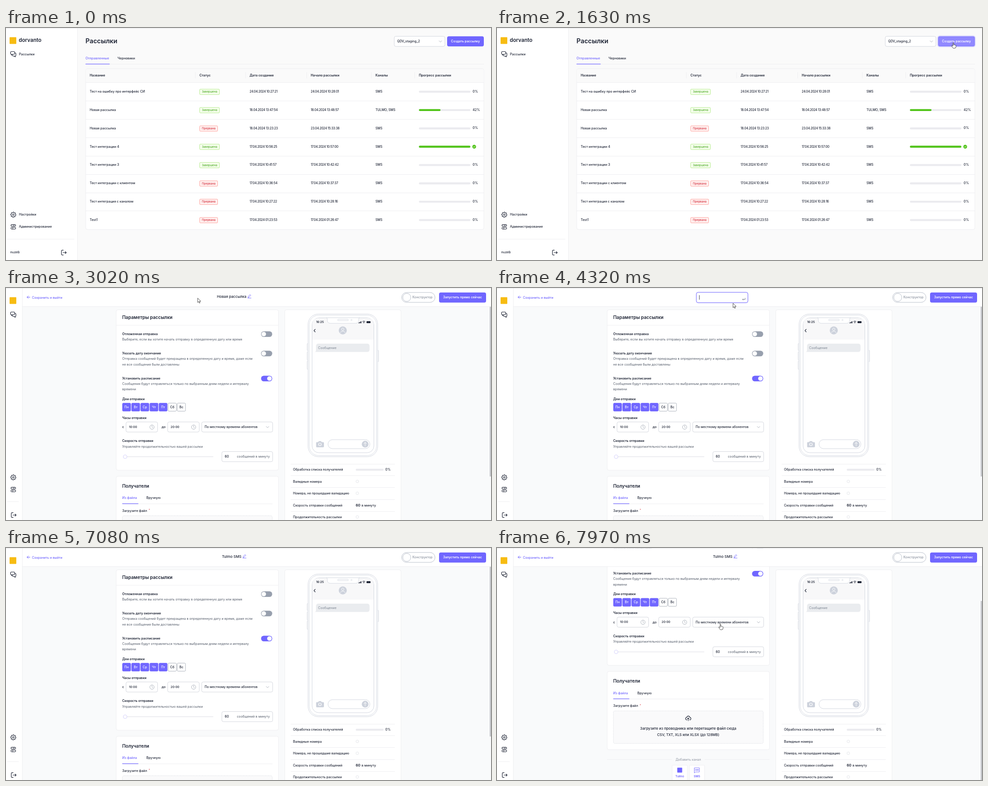
Animation, 1083 px wide and 517 px high, one loop 8000 ms. Source, as an HTML page:

```html
<!DOCTYPE html>
<html lang="ru">
<head>
<meta charset="utf-8">
<title>Рассылки</title>
<style>
  html, body { margin: 0; width: 100%; height: 100%; overflow: hidden; background: #fafafa; }
  svg { display: block; width: 1083px; height: 517px; }
  text { font-family: Inter, "Open Sans", "Noto Sans", sans-serif; white-space: pre; }
  .date { letter-spacing: -.25px; }
</style>
</head>
<body>
<svg id="stage" viewBox="0 0 1083 517" xmlns="http://www.w3.org/2000/svg"></svg>
<script>
const LOOP = 8000;
const INK = '#1c2233', GREY = '#525a68', PALE = '#cdd2dc', EDGE = '#eeeef1', BORDER = '#d4d7de';
const VIOLET = '#7066ff', GREEN = '#52c41a';
const stage = document.getElementById('stage');

// y is the vertical centre of the capitals
const text = (x, y, s, { size = 7.2, weight = 500, fill = INK, anchor = 'start', cls = '', id = '' } = {}) =>
  `<text ${id && `id="${id}"`} class="${cls}" x="${x}" y="${y + size * .36}" font-size="${size}" font-weight="${weight}" fill="${fill}" text-anchor="${anchor}">${s}</text>`;
const bold = (x, y, s, size = 7.15) => text(x, y, s, { size, weight: 600 });
const note = (x, y, s) => text(x, y, s, { size: 7.15, weight: 400, fill: GREY });
const rect = (x, y, w, h, fill, r = 0, stroke = 'none', extra = '') =>
  `<rect x="${x}" y="${y}" width="${w}" height="${h}" rx="${r}" fill="${fill}" stroke="${stroke}" ${extra}/>`;
const circle = (x, y, r, fill, stroke = 'none', width = 1) =>
  `<circle cx="${x}" cy="${y}" r="${r}" fill="${fill}" stroke="${stroke}" stroke-width="${width}"/>`;
const path = (d, stroke = INK, width = 1, extra = '') =>
  `<path d="${d}" fill="none" stroke="${stroke}" stroke-width="${width}" stroke-linecap="round" stroke-linejoin="round" ${extra}/>`;
const hline = (x1, x2, y, color = EDGE, width = 1) => path(`M${x1} ${y}H${x2}`, color, width);
const group = (id, body, extra = '') => `<g id="${id}" ${extra}>${body}</g>`;
const box = (x, y, w, h) => rect(x, y, w, h, '#fff', 3.5, BORDER);
const card = (x, y, w, h) => rect(x, y, w, h, '#fff', 4, EDGE);
const chevron = (x, y) => path(`M${x - 3} ${y - 1.5}l3 3l3 -3`, '#a5abb6', .9);
const clock = (x, y) => circle(x, y, 4.8, 'none', '#9aa1ad', .8) + path(`M${x} ${y - 3}v3l2 1.2`, '#9aa1ad', .8);
const bar = (x, y, w, part) => rect(x, y - 2.2, w, 4.4, '#ebebef', 2.2) +
  (part ? rect(x, y - 2.2, w * part, 4.4, GREEN, 2.2) : '');

// Icons, each drawn around its own origin
const chatIcon = path('M-4.5 -5.5h6q1.5 0 1.5 1.5v3q0 1.5 -1.5 1.5h-3.5l-2 2v-2h-.5q-1.5 0 -1.5 -1.5v-3q0 -1.5 1.5 -1.5M3 -2.5h1q1.8 0 1.8 1.5v4q0 1.5 -1.5 1.5v2l-2 -2h-2.5q-1.5 0 -1.5 -1.5v-1', INK, 1.2);
const gearIcon = (() => {
  const points = Array.from({ length: 32 }, (_, i) => {
    const a = i * Math.PI / 16, r = i % 4 < 2 ? 5.9 : 4.6;
    return `${(r * Math.cos(a)).toFixed(2)} ${(r * Math.sin(a)).toFixed(2)}`;
  });
  return path('M' + points.join('L') + 'Z', INK, 1.1) + circle(0, 0, 1.8, 'none', INK, 1.1);
})();
const slidersIcon = rect(-5.3, -4.9, 10.6, 3.9, 'none', 1.9, INK, 'stroke-width="1.1"') + path('M1.3 -4.5v3', INK) +
  rect(-5.3, 1.3, 10.6, 3.9, 'none', 1.9, INK, 'stroke-width="1.1"') + path('M-1.3 1.8v3', INK);
const exitIcon = path('M-1 -5.3h-2.5q-1.7 0 -1.7 1.7v7.2q0 1.7 1.7 1.7h2.5M-1.5 0h7M3.2 -2.4l2.4 2.4l-2.4 2.4', INK, 1.2);
const pencilIcon = path('M.5 6.2l.5 -2.3l4 -4l1.7 1.7l-4 4zM0 7.6h7.4', VIOLET, .9);

function listPage() {
  const rows = [
    ['Тест на ошибку про интерфейс СИ', 1, '24.04.2024 10:27:21', '24.04.2024 10:28:01', 0],
    ['Новая рассылка', 1, '18.04.2024 13:47:54', '18.04.2024 13:48:57', .42],
    ['Новая рассылка', 0, '18.04.2024 13:23:23', '23.04.2024 15:33:38', 0],
    ['Тест интеграции 4', 1, '17.04.2024 10:56:25', '17.04.2024 10:57:00', 1],
    ['Тест интеграции 3', 1, '17.04.2024 10:41:57', '17.04.2024 10:42:42', 0],
    ['Тест интеграции с клиентом', 0, '17.04.2024 10:36:54', '17.04.2024 10:37:37', 0],
    ['Тест интеграция с каналом', 0, '17.04.2024 10:27:22', '17.04.2024 10:28:16', 0],
    ['Test1', 0, '17.04.2024 01:23:53', '17.04.2024 01:26:47', 0],
  ];
  const date = { size: 6.9, cls: 'date' };
  const tag = (y, done) => done
    ? rect(432.5, y - 6, 44, 12, '#f6ffed', 1.5, '#b7eb8f') + text(454.5, y - .3, 'Завершена', { size: 6.3, weight: 400, fill: '#389e0d', anchor: 'middle' })
    : rect(432.5, y - 6, 40, 12, '#fff1f0', 1.5, '#ffa39e') + text(452.5, y - .3, 'Прервана', { size: 6.3, weight: 400, fill: '#cf1322', anchor: 'middle' });
  const row = ([name, done, created, started, part], i) => {
    const y = 142 + i * 40.85;
    return (i ? hline(178, 1067, Math.round(y - 20.5) + .5) : '') +
      text(187, y - .5, name) + tag(y + .3, done) +
      text(544, y - .5, created, date) + text(680.5, y - .5, started, date) +
      text(825, y - .5, part === .42 ? 'TULMO, SMS' : 'SMS', { size: 7 }) + bar(922, y, 115, part) +
      (part === 1
        ? circle(1045.5, y, 4.2, GREEN) + path(`M1043.6 ${y}l1.4 1.5l2.4 -2.8`, '#fff', .9)
        : text(1042, y - .8, Math.round(part * 100) + '%'));
  };
  const heads = [[187, 'Название'], [432, 'Статус'], [544, 'Дата создания'], [680.5, 'Начало рассылки'], [825, 'Каналы'], [922, 'Прогресс рассылки']];
  return bold(177.5, 29, 'Рассылки', 14.4) +
    box(867, 18.5, 113, 22.5) + text(873.5, 29.5, 'QDV_staging_2', { size: 7.1 }) + chevron(970, 30) +
    rect(985, 18.5, 82, 22.5, VIOLET, 4, 'none', 'id="create"') +
    text(1026, 29.5, 'Создать рассылку', { size: 6.9, weight: 600, fill: '#fff', anchor: 'middle' }) +
    text(177.5, 67.5, 'Отправленные', { fill: VIOLET }) + text(249, 67.5, 'Черновики') +
    hline(178, 1067, 80.5) + hline(178, 231, 80.3, VIOLET, 1.3) +
    card(178, 90.5, 889, 358.5) + rect(178.5, 91, 888, 30.5, '#fafafa', 3) + hline(178, 1067, 121.5) +
    heads.map(([x, s]) => bold(x, 105.3, s, 7.2)).join('') +
    [423, 535, 671.5, 816, 912.5].map(x => path(`M${x} 99v13`, EDGE)).join('') +
    rows.map(row).join('');
}

function settings() {
  const toggle = (y, on) => rect(569.5, y - 6.3, 25, 12.6, on ? VIOLET : '#98a0ae', 6.3) + circle(on ? 588.2 : 575.6, y, 5, '#fff');
  const day = (s, i) => {
    const x = 260 + i * 20.4, on = i < 5;
    return rect(x, 256.5, 18.4, 18, on ? VIOLET : '#fff', 2, on ? VIOLET : '#9aa1ad', 'stroke-width=".8"') +
      text(x + 9.2, 265.3, s, { fill: on ? '#fff' : INK, anchor: 'middle' });
  };
  const channel = (x, name, icon) => rect(x, 629.5, 34, 40, '#000', 1, 'none', 'opacity=".08"') + rect(x, 628.5, 34, 40, '#fff', 1, EDGE) +
    icon + text(x + 17, 653.3, name, { size: 6.5, weight: 600, fill: VIOLET, anchor: 'middle' });
  return card(246, 48.5, 362.5, 357.5) + bold(259.5, 65.3, 'Параметры рассылки', 10.2) + hline(246, 608, 83) +
    bold(259.5, 102, 'Отложенная отправка') + toggle(102.8, false) +
    note(259.5, 114.5, 'Выберите, если вы хотите начать отправку в определенную дату или время') +
    bold(259.5, 145, 'Указать дату окончания') + toggle(146, false) +
    note(259.5, 157.5, 'Отправка сообщений будет прекращена в определенную дату и время, даже если') +
    note(259.5, 170, 'не все сообщения были доставлены') +
    bold(259.5, 201, 'Установить расписание') + toggle(201.8, true) +
    note(259.5, 213.3, 'Сообщения будут отправляться только по выбранным дням недели и интервалу') +
    note(259.5, 225.8, 'времени') +
    bold(259.5, 247.3, 'Дни отправки') + ['Пн', 'Вт', 'Ср', 'Чт', 'Пт', 'Сб', 'Вс'].map(day).join('') +
    bold(259.5, 289.3, 'Часы отправки') +
    text(259.5, 309.5, 'с') + box(268, 298.5, 70.5, 22.5) + text(274.5, 309.5, '10:00', { size: 6.8 }) + clock(326, 310) +
    text(347.5, 309.5, 'до') + box(361, 298.5, 70.5, 22.5) + text(367.5, 309.5, '20:00', { size: 6.8 }) + clock(419, 310) +
    box(437, 298.5, 158.5, 22.5) + text(443.5, 309.5, 'По местному времени абонентов', { size: 7.1 }) + chevron(584, 310) +
    bold(259.5, 340.5, 'Скорость отправки') + note(259.5, 353, 'Управляйте продолжительностью вашей рассылки') +
    hline(266, 462, 376, '#ededf1', 2) + circle(266, 376, 4, '#fff', '#d5d2fb', 1.1) +
    box(482, 364.5, 113.5, 22.5) + text(488.5, 375.5, '60') + text(589, 375.5, 'сообщений в минуту', { weight: 400, fill: GREY, anchor: 'end' }) +

    card(246, 419.5, 362.5, 174.5) + bold(259.5, 441, 'Получатели', 10.1) +
    text(259.5, 467.5, 'Из файла', { fill: VIOLET }) + text(313.5, 467.5, 'Вручную') +
    hline(260, 595, 481) + hline(260, 295, 480.6, VIOLET, 1.3) +
    text(259.5, 496, 'Загрузите файл') + text(318.5, 495, '*', { size: 6, fill: '#e0454a' }) +
    rect(260, 507.5, 334.5, 72.5, '#fafafb', 3, '#d9dbe0', 'stroke-dasharray="2 1.5" stroke-width=".9"') +
    path('M424 527.6h-.5q-2.5 -.4 -2.5 -2.8t2.6 -2.7q.8 -3.2 3.6 -3.2t3.6 3.2q2.3 .3 2.3 2.7t-2.3 2.8h-.5M427 529.5v-6M424.8 525.3l2.2 -2.2l2.2 2.2', INK, 1.1) +
    text(427, 546.3, 'Загрузите из проводника или перетащите файл сюда', { size: 8.15, anchor: 'middle' }) +
    text(427, 560.3, 'CSV, TXT, XLS или XLSX (до 128MB)', { size: 7.9, anchor: 'middle' }) +
    hline(246, 390, 616) + hline(464, 608, 616) +
    text(427, 615.5, 'Добавить канал', { weight: 400, fill: '#8a919e', anchor: 'middle' }) +
    channel(391, 'Tulmo', rect(402.5, 634, 11, 11, VIOLET, 1)) +
    channel(429.5, 'SMS', path('M441 634.5h11v9h-8.5l-2.5 2z', VIOLET, .9) + text(446.5, 639, 'SMS', { size: 4, weight: 700, fill: VIOLET, anchor: 'middle' }));
}

function preview() {
  const dim = { fill: '#7c8592', weight: 400 };
  const labels = ['Обработка списка получателей', 'Валидные номера', 'Номера, не прошедшие валидацию', 'Скорость отправки сообщений', 'Продолжительность рассылки'];
  const statY = i => 404.8 + i * 26.4;
  return card(622.5, 48.5, 259.5, 480) +
    [[124, 15], [142.5, 18], [163, 18]].map(([y, h]) => rect(672.3, y, 2.5, h, '#fff', 1, PALE, 'stroke-width=".8"')).join('') +
    rect(829.5, 139, 2.5, 25, '#fff', 1, PALE, 'stroke-width=".8"') +
    rect(674.5, 58, 155.5, 318, '#fff', 23, PALE, 'stroke-width=".9"') + rect(677.2, 60.5, 150.2, 313, '#fff', 21, PALE, 'stroke-width=".8"') +
    rect(683.5, 66.5, 138, 300.5, '#fff', 15, PALE, 'stroke-width=".9"') +
    `<path d="M684 115V82q0 -15 15 -15h107q15 0 15 15v33z" fill="#f8f8f9"/>` +
    `<path d="M715 66.2q2.5 .3 2.5 3v2.5q0 7 7 7h56q7 0 7 -7v-2.5q0 -2.7 2.5 -3z" fill="#fff" stroke="${PALE}" stroke-width=".8"/>` +
    rect(740.5, 69.8, 24, 3, '#fff', 1.5, PALE, 'stroke-width=".8"') + circle(771.5, 71.3, 1.4, '#fff', PALE, .8) +
    bold(692.5, 75.8, '16:25', 6.6) +
    [0, 1, 2, 3].map(i => rect(787 + i * 1.8, 77 - i, 1.3, 1.5 + i, INK, .3)).join('') +
    path('M796.3 74.6q2.7 -2.2 5.4 0M797.6 76.4q1.4 -1 2.8 0', INK, 1) + circle(799, 78, .7, INK) +
    rect(805, 74, 9, 4.2, INK, 1.2) + path('M690.5 92l-2.8 3l2.8 3', INK, 1.1) +
    circle(752, 94.5, 9, PALE) + circle(752, 92, 2.7, 'none', '#fff', .9) + path('M747 99.7q0 -3.3 5 -3.3t5 3.3', '#fff', .9) +
    `<path d="M690 142.5q2.3 -1.2 2.3 -4v-9q0 -5.5 5.5 -5.5h108.500q5.500 0 5.500 5.500v7.500q0 5.500 -5.500 5.500z" fill="#eaecef"/>` +
    text(697, 133, 'Сообщение', dim) +
    `<path d="M694 343.500h3l1.500 -2.300h5l1.500 2.300h3q2 0 2 2v7.500q0 2 -2 2h-14q-1.500 0 -1.500 -2v-7.500q0 -2 1.500 -2z" fill="${PALE}"/>` +
    circle(701, 348.5, 3, 'none', '#fff', 1.2) + rect(719, 338, 93.5, 20, '#fff', 10, PALE, 'stroke-width=".9"') +
    circle(802, 348, 7.6, PALE) + path('M802 352v-8M799 347l3 -3l3 3', '#fff', 1) +
    [392.5, 418, 444.5, 471.5, 498].map(y => hline(636, 868, y)).join('') +
    labels.map((s, i) => text(641, statY(i), s, { size: 7.1 })).join('') +
    bar(781, 405, 62, 0) + text(847, 404.6, '0%') +
    [1, 2, 4].map(i => circle(784.5, statY(i) - .2, 3, '#fff', '#dfe1e6', .9)).join('') +
    bold(781, 484, '60', 8) + text(794, 484, 'в минуту');
}

const header = () => rect(37, 1, 1046, 40, '#fff') + hline(37, 1083, 41.3) +
  path('M53.500 20.500h-6.500M50 17.500l-3 3l3 3', VIOLET, 1) + text(58, 21, 'Сохранить и выйти', { fill: VIOLET, size: 7.15 }) +
  rect(883.5, 10, 74.5, 22, '#fff', 11, '#b9bfca') + circle(895, 21, 9, '#fff', '#b9bfca') +
  text(907.5, 20.5, 'Конструктор', { fill: '#8a919e', size: 7.1 }) +
  rect(967, 10, 105, 22.5, VIOLET, 4) + text(1019.5, 20.5, 'Запустить прямо сейчас', { size: 7, weight: 600, fill: '#fff', anchor: 'middle' }) +
  group('heading', text(0, 19.3, '', { id: 'title', size: 8.1 }) + group('pencil', pencilIcon)) +
  group('field', rect(443.7, 8.2, 118, 26.3, VIOLET, 5, 'none', 'opacity=".1"') + rect(445.2, 9.7, 115, 23, '#fff', 4, VIOLET) +
    text(451.5, 21, '', { id: 'typed', size: 8.1 }) + path('M554 22.500v3h-5.500M549.800 23.900l-1.600 1.600l1.600 1.600', '#6b7280', .9) +
    rect(451.5, 16, .9, 10, INK, 0, 'none', 'id="caret"'));

const expandedNav = () => bold(28.5, 27, 'dorvanto', 11.6) + text(29, 58, 'Рассылки') + text(29, 415.3, 'Настройки') +
  text(29, 442.8, 'Администрирование', { size: 7.1 }) + text(9.500, 499.3, 'nuzeb');
const sidebar = () => rect(0, 0, 160, 517, '#fff', 0, 'none', 'id="side"') + path('M.5 0v517', EDGE, 1, 'id="sideEdge"') +
  rect(8, 20.5, 15, 15, '#f7bc12', 1) + group('labels', expandedNav()) + path('', EDGE, 1, 'id="rule"') +
  group('chat', chatIcon) + group('gear', gearIcon) + group('sliders', slidersIcon) + group('exit', exitIcon);

stage.innerHTML = rect(0, 0, 1083, 517, '#fafafa') + group('list', listPage()) +
  group('editor', rect(37, 41, 1046, 476, '#f9fafb') + group('scroll', settings()) + preview() + rect(1080, 41, 3, 379, '#c6c8cc', 0, 'none', 'id="thumb"') + header()) +
  sidebar() + hline(0, 1083, .3, '#e2e2e5') +
  group('cursor',
    group('arrow', `<path d="M0 0v9.800l2.300 -2.100l1.500 3.500l1.600 -.7l-1.500 -3.400h3.200z" fill="#fff" stroke="#222" stroke-width=".8"/>`) +
    group('hand', `<path d="M-.9 .8q.9 -1.500 1.800 0v4.200q1.400 -.8 1.800 .3q1.300 -.5 1.700 .5q1.300 -.3 1.500 .9v2.500q0 3.500 -3.500 3.500h-1.500q-1.800 0 -2.800 -2l-1.900 -3.300q-.2 -1.400 1.300 -1l1.600 1.400z" fill="#fff" stroke="#222" stroke-width=".8"/>`));

const $ = Object.fromEntries([...stage.querySelectorAll('[id]')].map(e => [e.id, e]));
const show = (e, on) => { e.style.display = on ? '' : 'none'; };
const move = (e, x, y) => e.setAttribute('transform', `translate(${x} ${y})`);
const set = (e, attrs) => { for (const k in attrs) e.setAttribute(k, attrs[k]); };
const progress = (t, a, b) => Math.min(1, Math.max(0, (t - a) / (b - a)));
const smooth = u => u * u * (3 - 2 * u);
const mix = (a, b, u) => a + (b - a) * u;
const within = (t, ...spans) => spans.some(([a, b]) => t >= a && t < b);

// time, x, y of the pointer tip
const track = [
  [150, 1064, -8], [180, 1064, -8], [360, 1057, 23], [950, 1019, 32.5], [2160, 1019, 32.5], [2410, 451, 56], [2560, 451, 56],
  [3020, 428, 22.5], [3300, 369, 40], [3400, 343, 45], [3630, 545, 17], [4040, 545, 17], [4320, 527, 34],
  [6560, 527, 34], [6710, 500, 118], [7510, 500, 21], [7620, 499, 169.5], [8000, 499, 169.5],
];
const typing = [[4900, 'T'], [5150, 'Tu'], [5500, 'Tulmo'], [5650, 'Tulmo SMS']];
const NAVIGATE = 1720, OPEN = 2160, EDIT = 4100, COMMIT = 6940;

function drawCursor(t) {
  show($.cursor, within(t, [150, 180], [360, 7080], [7510, LOOP]));
  const next = track.findIndex(k => k[0] > t);
  if (next > 0) {
    const [ta, xa, ya] = track[next - 1], [tb, xb, yb] = track[next];
    const u = smooth(progress(t, ta, tb));
    move($.cursor, mix(xa, xb, u), mix(ya, yb, u));
  }
  const hand = within(t, [360, OPEN], [3600, EDIT], [7920, LOOP]);
  show($.hand, hand);
  show($.arrow, !hand);
}

function drawSidebar(t) {
  const k = smooth(progress(t, NAVIGATE, 2000)), width = mix(159.5, 36.5, k);
  set($.side, { width });
  move($.sideEdge, width - .5, 0);
  show($.labels, t < NAVIGATE);
  set($.rule, { d: `M3 ${mix(470.5, 476, k)}H${mix(152, 28, k)}` });
  move($.chat, 16.3, mix(58, 59, k));
  move($.gear, 16.3, mix(416, 422, k));
  move($.sliders, 16.3, mix(443, 449, k));
  move($.exit, mix(129, 17, k), mix(500.5, 506, k));
}

function drawHeading(t) {
  const editing = within(t, [EDIT, COMMIT]);
  show($.heading, !editing);
  show($.field, editing);
  $.title.textContent = t < COMMIT ? 'Новая рассылка' : 'Tulmo SMS';
  $.typed.textContent = typing.reduce((s, [at, value]) => t >= at ? value : s, '');
  if (t < OPEN) return;
  if (editing) {
    move($.caret, $.typed.getComputedTextLength(), 0);
    show($.caret, !within(t, [4820, 4900], [6060, 6560]));
  } else {
    const w = $.title.getComputedTextLength(), x = 509.5 - (w + 11) / 2;
    set($.title, { x });
    move($.pencil, x + w + 3, 14.8);
  }
}

function drawCreateButton(t) {
  const hover = progress(t, 360, 520), glow = smooth(progress(t, 1310, 1650));
  set($.create, {
    fill: `rgb(${mix(112, 145, hover)} ${mix(102, 137, hover)} 255)`,
    stroke: glow ? `rgba(112,102,255,${.3 - .1 * glow})` : 'none',
    'stroke-width': 4 * glow,
  });
}

function update(t) {
  show($.list, t < NAVIGATE);
  show($.editor, t >= OPEN);
  drawCreateButton(t);
  drawSidebar(t);
  drawHeading(t);
  const scroll = 144.5 * progress(t, 7560, 7970) ** 1.17;
  move($.scroll, 0, -scroll);
  const top = 41 + scroll * .533;
  set($.thumb, { y: top, height: Math.min(517, 420 + scroll * .75) - top });
  drawCursor(t);
}

const start = performance.now();
function frame() {
  update((performance.now() - start) % LOOP);
  requestAnimationFrame(frame);
}
update(0);
requestAnimationFrame(frame);
</script>
</body>
</html>
```
